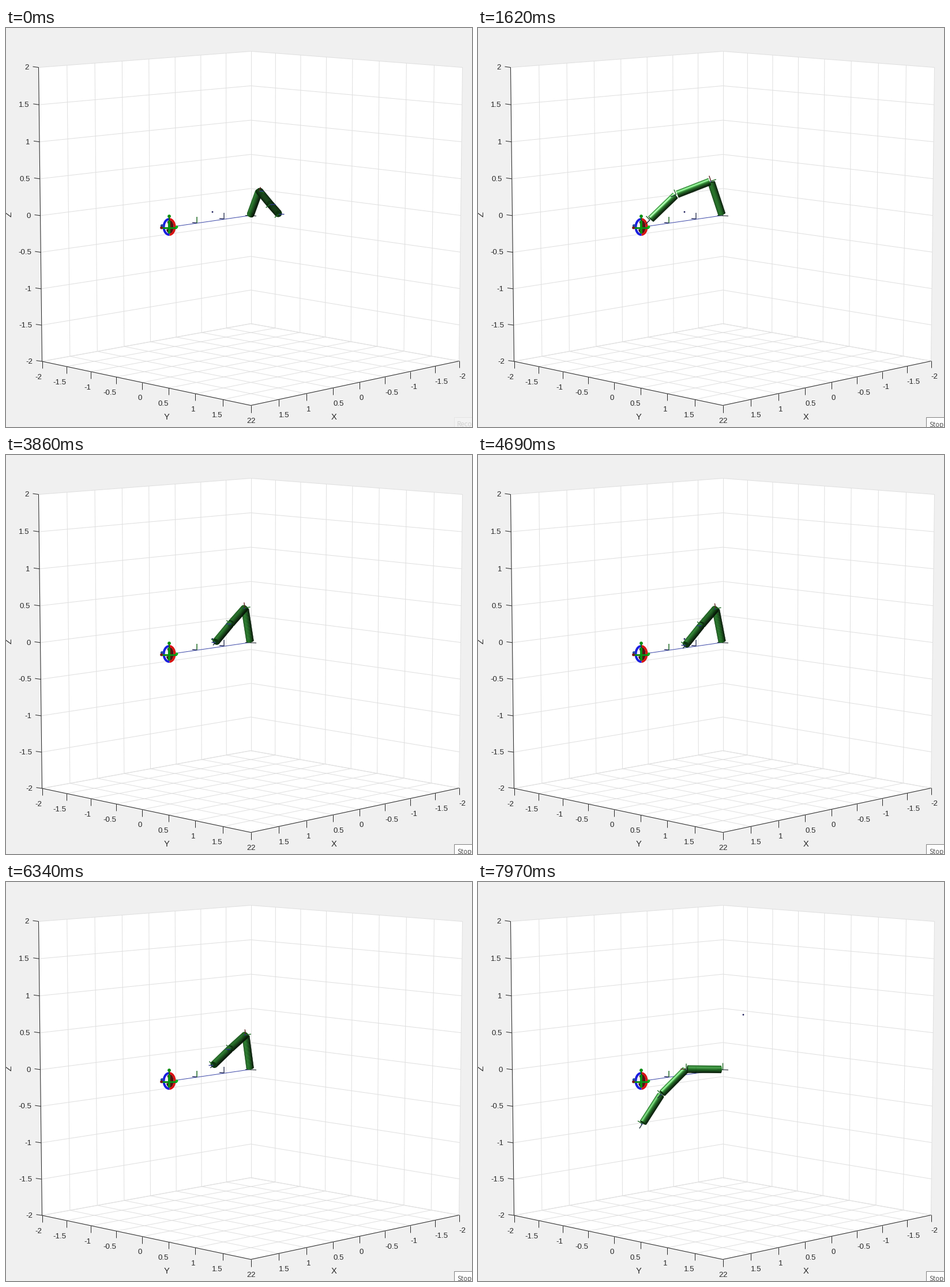
Recreate the animation shown at these times as a matplotlib script. Size 808 by 693 pixels, loop 8000 ms.

```python
import numpy as np
import matplotlib.pyplot as plt
from matplotlib.animation import FuncAnimation
from matplotlib.collections import LineCollection, PolyCollection
from matplotlib.patches import Arc, Circle, Ellipse, Polygon, Rectangle

W, H, DPI = 808, 693, 100
STEP, FRAMES = 50, 160
PX = 72 / DPI
INK, GRID = "#262626", "#dfdfdf"
FONT = "Liberation Sans"

fig = plt.figure(figsize=(W / DPI, H / DPI), dpi=DPI, facecolor="#f0f0f0")
ax = fig.add_axes([0, 0, 1, 1])
ax.set_xlim(0, W)
ax.set_ylim(H, 0)
ax.axis("off")


def line(pts, color, width=1, z=2):
    xs, ys = zip(*pts)
    ax.plot(xs, ys, color=color, lw=width * PX, zorder=z, solid_capstyle="butt")


def label(x, y, text, size=13.3, color=INK, font=FONT, **kw):
    return ax.text(x, y, text, fontsize=size * PX, color=color, family=font, **kw)


def plane(corners):
    """Perspective map of the square [-2, 2]^2 onto four stage points."""
    rows, rhs = [], []
    for (u, v), (x, y) in zip([(2, -2), (-2, -2), (-2, 2), (2, 2)], corners):
        rows += [[u, v, 1, 0, 0, 0, -u * x, -v * x], [0, 0, 0, u, v, 1, -u * y, -v * y]]
        rhs += [x, y]
    m = np.append(np.linalg.solve(rows, rhs), 1).reshape(3, 3)

    def project(u, v):
        x, y, w = m @ (u, v, 1)
        return x / w, y / w
    return project


# ---- axes box ----
TL, TM, TR = (56.5, 68.5), (424.5, 40.5), (791.5, 68.5)
BL, BM, BR, FRONT = (62.5, 579), (424.5, 513.5), (785.5, 578.5), (424.5, 655.5)
left = plane([BL, BM, TM, TL])
right = plane([BR, BM, TM, TR])
floor = plane([BL, BM, BR, FRONT])
values = np.arange(-2, 2.1, 0.5)

ax.add_patch(Polygon([TL, TM, TR, BR, FRONT, BL], fc="white", ec="none", zorder=1))
for side in (left, right, floor):
    for v in values:
        line([side(v, -2), side(v, 2)], GRID)
        line([side(-2, v), side(2, v)], GRID)
line([TL, BL, FRONT, BR], INK, 1, 3)

for v in values:
    name = f"{v:g}"
    x, y = left(2, v)
    line([(x - 10, y - 1.4), (x, y)], INK, 1, 3)
    label(x - 16.5, y + 3.9, name, ha="right")
    x, y = floor(2, v)
    line([(x, y), (x, y + 12)], INK, 1, 3)
    label(x, y + 30.7, name, ha="right")
    x, y = floor(v, 2)
    line([(x, y), (x, y + 12)], INK, 1, 3)
    label(x, y + 30.7, name, ha="left")

label(278, 679.5, "Y", 14.6, ha="center")
label(569, 679.5, "X", 14.6, ha="center")
label(6, 323, "Z", 14.6, ha="center", va="center", rotation=90)

# ---- resting chain and target dot ----
BASE = np.array([424.0, 325.5])
line([BASE, (283, 346)], "#3c48a8", 1, 4)
for x, y, up in ((331, 338.5, "#1d6a22"), (378, 331.5, "#3a4260")):
    line([(x, y), (x, y - 11)], up, 1.5, 4)
    line([(x, y), (x - 8, y - 0.5)], "#343a66", 1.5, 4)
line([BASE, BASE - (0, 12)], "#1d6a22", 1.3, 4)
line([BASE - (9, 0), BASE + (10, 1)], "#30343c", 1.2, 4)
dot = Circle((358, 319.5), 1.4, fc="#20205c", ec="none", zorder=5)
ax.add_patch(dot)

# ---- rotation marker ----
RED, GREEN, BLUE = "#d81414", "#0a8f14", "#1a1ee0"
MX, MY = 283, 345.5
ax.add_patch(Ellipse((MX, MY), 20, 28, fc="#f4f4f4", ec="none", zorder=6))
ax.add_patch(Ellipse((MX + 1, MY), 12, 22, fc="#541212", ec="#181818", lw=PX, zorder=6))
ax.add_patch(Ellipse((MX - 4, MY - 2), 4, 13, fc="#f4f4f4", ec="none", zorder=6))
for a, b, color in ((-88, 88, RED), (88, 272, BLUE)):
    ax.add_patch(Arc((MX, MY), 19, 27, theta1=a, theta2=b, color=color, lw=4 * PX, zorder=7))
line([(MX, 327), (MX, 336)], "#0d6a14", 2, 8)
line([(MX, 335), (MX, 357)], GREEN, 4, 8)
line([(270, 347), (296, 347)], GREEN, 3, 8)
for x, y, r, color in ((283, 327, 2.9, GREEN), (296, 345.5, 2.4, "#0cb418"),
                       (270.5, 343.5, 2.7, "#274a9c"), (269.5, 347, 2.4, "#7a1616")):
    ax.add_patch(Circle((x, y), r, fc=color, ec="none", zorder=9))

# ---- tooltip ----
tip_box = Rectangle((777, 676), 60, 40, lw=PX, zorder=10)
ax.add_patch(tip_box)
tip_text = label(782, 692.5, "", 11.5, font="Noto Sans CJK JP", zorder=11)

# ---- arm ----
# shoulder, elbow and hand positions at each key time
TIMES = [70, 450, 870, 1350, 1620, 2240, 2970, 4690, 5570, 7020, 7200, 7350, 7650, 7950]
POSES = np.array([
    (439, 283, 458, 306, 473, 323),
    (428, 260, 415, 272, 395, 292),
    (411, 262, 366, 270, 320, 296),
    (402, 266, 337, 284, 286, 327),
    (404, 266, 344, 290, 299, 334),
    (413, 264, 378, 289, 348, 321),
    (416.5, 264, 392, 291, 367, 320),
    (412, 267, 387, 296, 359, 331),
    (417, 265, 391, 290, 363, 317),
    (414, 266, 386, 290, 355, 320),
    (378, 361, 333, 392, 290, 432),
    (382, 287, 338, 327, 296, 372),
    (363, 307, 301, 340, 243, 372),
    (361, 325, 318, 368.5, 285, 420),
])
HOVER = (2970, 7020)
LINK, RADIUS, STRIPS = 64, 6.3, 14
LIGHT = np.array([-0.42, -0.51, 0.75])
PAINT = np.array([44, 146, 48]) / 255

links = []
for z in (20, 22, 24):
    cap = Ellipse((0, 0), 1, 1, fc="#0d3310", ec="none", zorder=z)
    near = Ellipse((0, 0), 1, 1, fc="#123f15", ec="none", zorder=z - 0.5)
    body = PolyCollection([], zorder=z, lw=0.4)
    for part in (cap, near):
        ax.add_patch(part)
    ax.add_collection(body)
    links.append((body, near, cap))
triads = LineCollection([], lw=1.4 * PX, zorder=26)
ax.add_collection(triads)


def shade(side, s, flat):
    normal = np.array([*(side * s), np.sqrt(1 - s * s)])
    d = max(0, normal @ LIGHT)
    tone = PAINT * (0.22 + 0.78 * d ** 1.5) * (0.3 + 0.7 * flat)
    return np.clip(tone + 0.65 * d ** 16 * flat ** 6, 0, 1)


def place_link(parts, p, q):
    """Put one shaded cylinder from p to q; return its directions and tilt."""
    body, near, cap = parts
    u = q - p
    length = np.hypot(*u)
    u = u / length
    side = np.array([-u[1], u[0]])
    flat = min(length / LINK, 1)
    depth = np.sqrt(1 - flat ** 2)
    a, b = p + 2.5 * flat * u, q - 2.5 * flat * u
    edges = np.linspace(-1, 1, STRIPS + 1)
    rows = [(side * e * RADIUS, u * RADIUS * depth * np.sqrt(1 - e * e)) for e in edges]
    quads, colors = [], []
    for i in range(STRIPS):
        (s0, k0), (s1, k1) = rows[i], rows[i + 1]
        quads.append([a + s0 - k0, b + s0 - k0, b + s1 - k1, a + s1 - k1])
        colors.append(shade(side, (edges[i] + edges[i + 1]) / 2, flat))
    body.set_verts(quads)
    body.set_facecolor(colors)
    body.set_edgecolor(colors)
    for part, center in ((near, a), (cap, b)):
        part.set_center(center)
        part.width = 2 * RADIUS * depth + 0.1
        part.height = 2 * RADIUS
        part.angle = np.degrees(np.arctan2(u[1], u[0]))
    return u, side, flat, depth


def pose(t):
    spots = np.array([np.interp(t, TIMES, col) for col in POSES.T]).reshape(3, 2)
    if HOVER[0] < t < HOVER[1]:
        # small searching sway that fades out at each key time
        phase = np.interp(t, TIMES, range(len(TIMES))) % 1
        spots += np.sin(2 * np.pi * phase) * np.outer([0.5, 1.5, 3], [-1, 0.6])
    return spots


def update(n):
    t = n * STEP
    joints = [BASE - (0.5, 0), *pose(t)]
    segs, colors = [], []
    for i, parts in enumerate(links):
        p, q = joints[i], joints[i + 1]
        u, side, flat, depth = place_link(parts, p, q)
        out = np.array([1 if u[0] > 0 else -1, 0])
        segs += [(q, q + 10 * flat * u), (q, q + 9.5 * side), (q, q + 10 * depth * out)]
        colors += ["#5c2020" if i == 0 else "#1c3034", "#1d6a22", "#2c3690"]
    triads.set_segments(segs)
    triads.set_color(colors)

    dot.center = (358, 319.5) if t < 6810 else (460, 230.5)
    stop = t >= 1400
    tip_text.set_text("Stop" if stop else "Record")
    tip_text.set_color("#575757" if stop else "#d2d2d2")
    tip_box.set_facecolor("#fdfdfd" if stop else "#f2f2f2")
    tip_box.set_edgecolor("#808080" if stop else "#e4e4e4")
    return []


anim = FuncAnimation(fig, update, frames=FRAMES, interval=STEP, repeat=True,
                     repeat_delay=0, blit=False)
plt.show()
```
